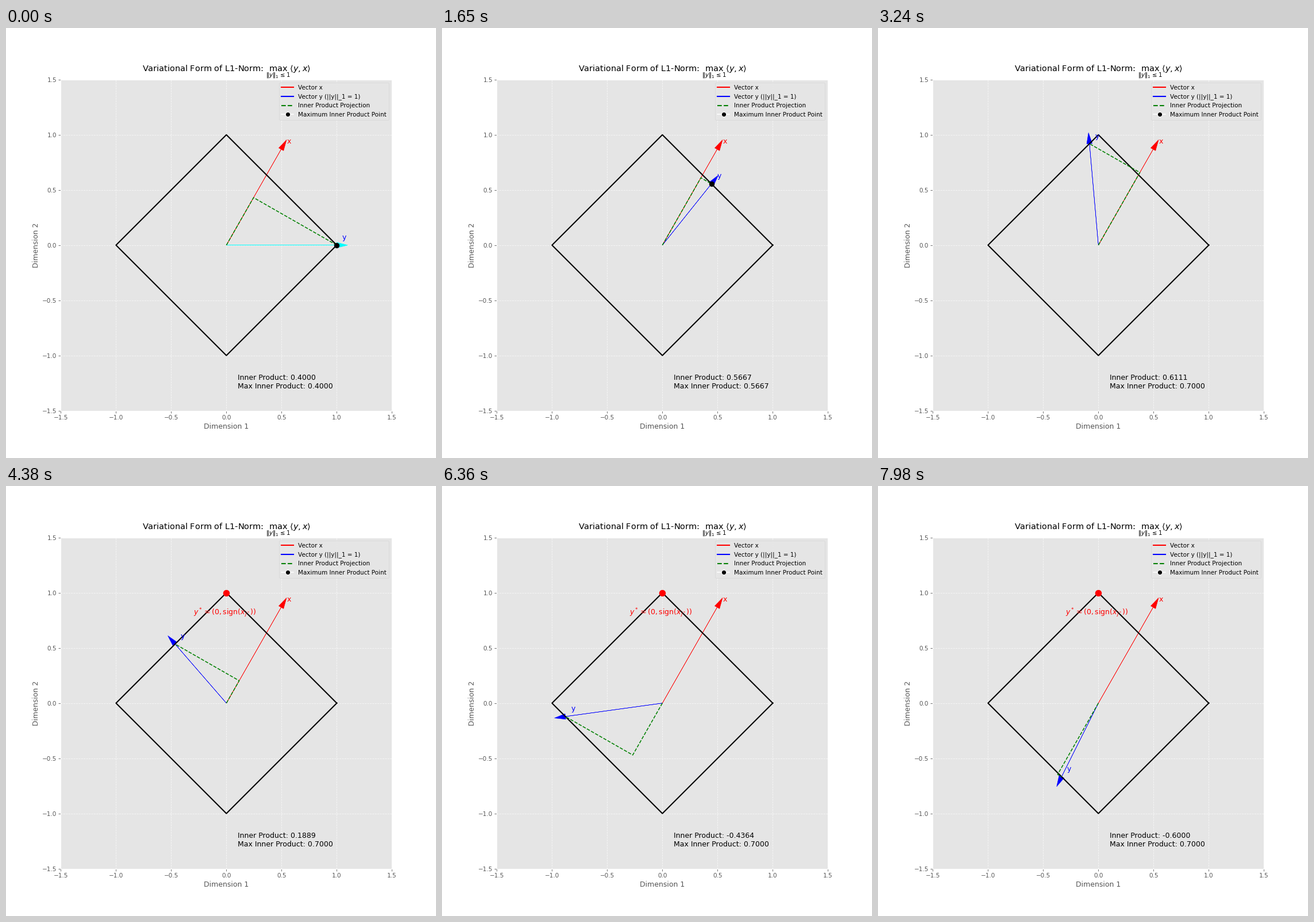
These frames come from a looping animation (748x748 px, 8 s). A matplotlib script:

```python
import numpy as np
import matplotlib.pyplot as plt
from matplotlib.animation import FuncAnimation
from matplotlib.lines import Line2D

FRAMES = 267
LOOP_MS = 8000
STEPS = 100          # samples per edge, both ends included
STAR_FRAME = 120     # when the maximiser is marked

plt.style.use("ggplot")
fig, ax = plt.subplots(figsize=(10, 10), dpi=74.8)

X = np.array([0.4, 0.7])
UNIT = X / np.hypot(*X)
CORNERS = np.array([(1, 0), (0, 1), (-1, 0), (0, -1)], float)
LABEL_GAP = 0.05


def point(n):
    """Position of y on the unit ball at step n."""
    edge, k = divmod(n, STEPS)
    t = k / (STEPS - 1)
    return (1 - t) * CORNERS[edge % 4] + t * CORNERS[(edge + 1) % 4]


def add_arrow(v, color):
    return ax.arrow(0, 0, *v, head_width=0.05, head_length=0.1, fc=color, ec=color)


def add_label(pos, text, color):
    return ax.text(*pos, text, color=color, fontsize=12)


ax.set_xlim(-1.5, 1.5)
ax.set_ylim(-1.5, 1.5)
ax.set_aspect("equal")
ax.grid(True, linestyle="--", alpha=0.7)
ax.set_xlabel("Dimension 1")
ax.set_ylabel("Dimension 2")
ax.set_title(
    r"Variational Form of L1-Norm: $\max_{\|y\|_1 \leq 1} \langle y, x \rangle$",
    fontsize=14,
)

ax.plot(*np.vstack([CORNERS, CORNERS[:1]]).T, "k-", lw=2)
add_arrow(UNIT, "red")
add_label(UNIT + LABEL_GAP, "x", "red")

y_arrow = add_arrow(CORNERS[0], "blue")
y_label = add_label(CORNERS[0] + LABEL_GAP, "y", "blue")
proj_line, = ax.plot([], [], "g--", lw=1.5)
max_dot, = ax.plot([], [], "ko", markersize=8)
star_dot, = ax.plot([0], [1], "ro", markersize=10)
star_label = add_label((-0.3, 0.8), r"$y^* = (0, \mathrm{sign}(x_{j^*}))$", "red")
inner_text = add_label((0.1, -1.22), "", "black")
max_text = add_label((0.1, -1.3), "", "black")

ax.legend(
    handles=[
        Line2D([0], [0], color="red", lw=2, label="Vector x"),
        Line2D([0], [0], color="blue", lw=2, label="Vector y (||y||_1 = 1)"),
        Line2D([0], [0], color="green", lw=2, ls="--", label="Inner Product Projection"),
        Line2D([0], [0], marker="o", color="w", markerfacecolor="black",
               markersize=8, label="Maximum Inner Product Point"),
    ],
    loc="upper right",
)

path = np.array([point(n) for n in range(FRAMES)])
inner = path @ X
best = np.maximum.accumulate(inner)


def update(n):
    y = path[n]
    y_arrow.set_data(dx=y[0], dy=y[1])
    at_corner = np.isclose(np.abs(y).max(), 1)
    y_arrow.set_color("cyan" if at_corner else "blue")
    y_label.set_position(y + LABEL_GAP)

    foot = (y @ UNIT) * UNIT
    proj_line.set_data([0, foot[0], y[0]], [0, foot[1], y[1]])
    max_dot.set_data([y[0]], [y[1]])
    max_dot.set_visible(bool(inner[n] >= best[n] - 1e-9))

    for part in (star_dot, star_label):
        part.set_visible(n >= STAR_FRAME)
    inner_text.set_text(f"Inner Product: {inner[n]:.4f}")
    max_text.set_text(f"Max Inner Product: {best[n]:.4f}")
    return ()


anim = FuncAnimation(fig, update, frames=FRAMES, init_func=lambda: update(0),
                     interval=LOOP_MS / FRAMES, repeat=True, repeat_delay=0)
plt.show()
```
